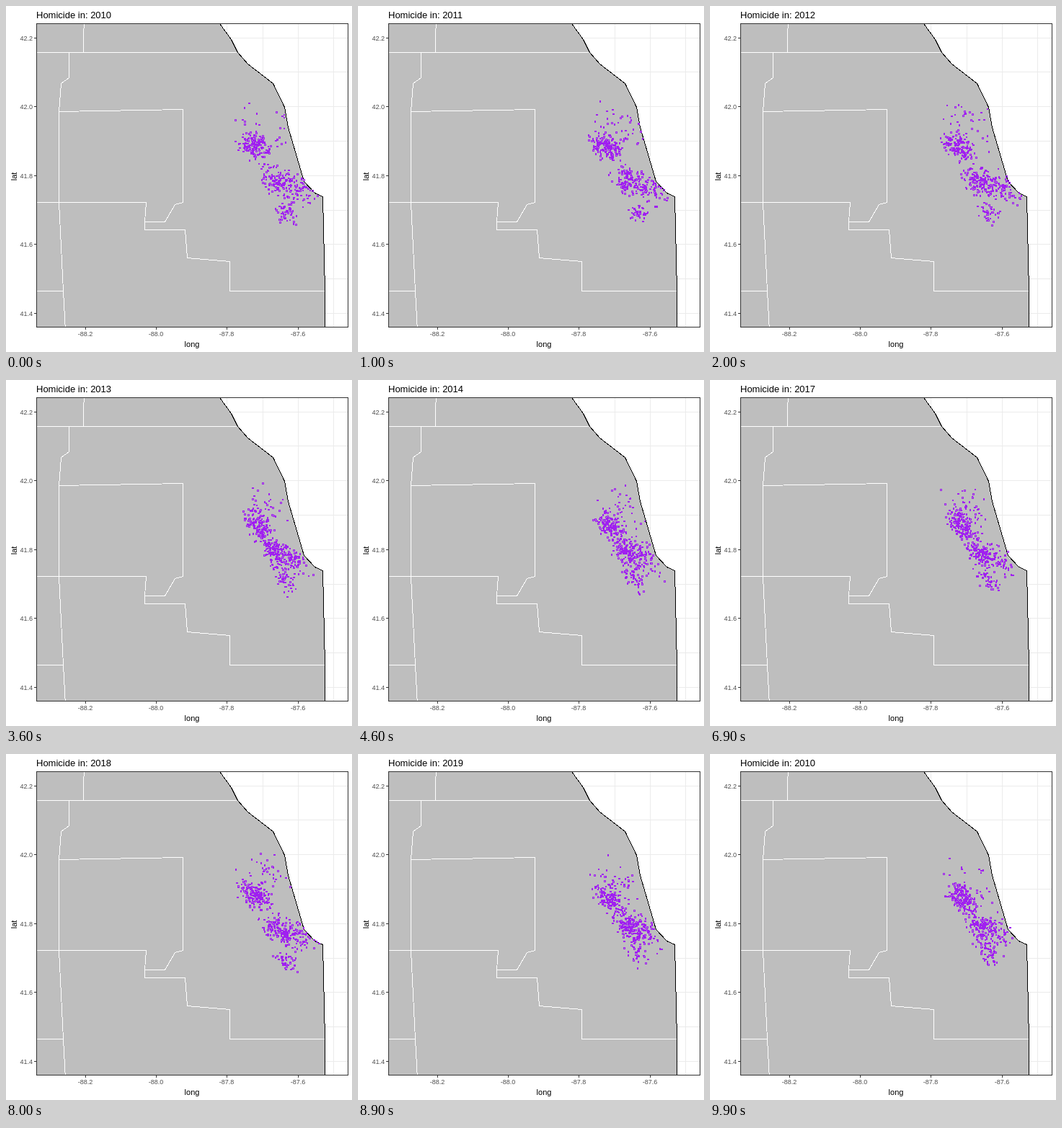
Write an HTML page that moves like this. It is 480x480 px and loops after 10000 ms.

```html
<!DOCTYPE html>
<html lang="en">
<head>
<meta charset="utf-8">
<title>Yearly map</title>
<style>
  html, body { margin: 0; width: 100%; height: 100%; overflow: hidden; background: #fff; }
  svg { display: block; width: 480px; height: 480px; font-family: "Liberation Sans", Arial, sans-serif; }
  path, rect { fill: none; shape-rendering: crispEdges; }
  #labels { font-size: 9px; fill: #4d4d4d; }
</style>
</head>
<body>
<svg viewBox="0 0 480 480">
  <path id="grid" stroke="#ebebeb"/>
  <path id="land" style="fill:#bebebe"/>
  <path stroke="#fff" d="M42 64.5H321M108.1 24L107.6 64.5M87.5 64.5V99.5L76.5 107.5 73.5 146.5V272.5L79.5 395.5 82.2 445
    M73.5 146.5L245.5 143.5V272.5L234.5 275.5 220.5 299.5H192.5V310.5H248.5L251.5 349.5 310.5 354.5V395.5H442
    M42 272.5H194.5L192.5 299.5M42 395.5H79.5"/>
  <path id="coast" stroke="#000"/>
  <path id="dots" stroke="#a020f0"/>
  <rect x="42.5" y="24.5" width="432" height="421" stroke="#333"/>
  <path id="ticks" stroke="#333"/>
  <g id="labels"></g>
  <text id="title" x="42" y="17" font-size="13"></text>
  <text x="258" y="473" font-size="11" text-anchor="middle">long</text>
  <text transform="translate(15 236.5) rotate(-90)" font-size="11" text-anchor="middle">lat</text>
</svg>
<script>
const el = id => document.getElementById(id);
const setPath = (id, d) => el(id).setAttribute('d', d);
const lerp = (a, b, t) => a + (b - a) * t;

// Shoreline from north to south
const shore = [[296, 24], [312, 46], [321, 64], [335, 80], [370, 107], [386, 140],
  [391, 168], [413, 243], [428, 259], [439, 264], [442, 395], [442, 445]];
const shoreLine = 'M' + shore.map(([x, y]) => `${x + .5} ${y + .5}`).join('L');
setPath('coast', shoreLine);
setPath('land', shoreLine + 'H42V24Z');

// Grid, ticks and axis labels
let grid = '', ticks = '', labels = '';
for (let i = 0; i < 9; i++) {
  const y = Math.floor(44 + i * 47.83) + .5;
  const x = Math.floor(110.5 + i * 49.1) + .5;
  grid += `M42 ${y}H474`;
  if (i < 8) grid += `M${x} 24V445`;
  if (i % 2 === 0) {
    ticks += `M39 ${y}H42`;
    labels += `<text x="37" y="${y + 3.5}" text-anchor="end">${(42.2 - i / 10).toFixed(1)}</text>`;
    if (i < 8) {
      ticks += `M${x} 446V449`;
      labels += `<text x="${x - .5}" y="458" text-anchor="middle">${(-88.2 + i / 10).toFixed(1)}</text>`;
    }
  }
}
setPath('grid', grid);
setPath('ticks', ticks);
el('labels').innerHTML = labels;

let seed = 2010;
function random() {
  seed = (seed + 0x6d2b79f5) | 0;
  let t = Math.imul(seed ^ seed >>> 15, 1 | seed);
  t = t + Math.imul(t ^ t >>> 7, 61 | t) ^ t;
  return ((t ^ t >>> 14) >>> 0) / 4294967296;
}
const normal = () => Math.sqrt(-2 * Math.log(1 - random())) * Math.cos(2 * Math.PI * random());

function shoreX(y) {
  const i = shore.findIndex(p => p[1] > y);
  const [x0, y0] = shore[i - 1], [x1, y1] = shore[i];
  return lerp(x0, x1, (y - y0) / (y1 - y0));
}

const clusters = [
  { x: 345, y: 195, spread: 11, share: .34 },
  { x: 377, y: 244, spread: 12, share: .33 },
  { x: 409, y: 253, spread: 13, share: .16 },
  { x: 389, y: 288, spread: 8, share: .1 },
  { x: 362, y: 165, spread: 20, share: .07 }
];

// A random spot near a cluster, on land
function place() {
  for (;;) {
    let pick = random();
    const c = clusters.find(c => (pick -= c.share) < 0) || clusters[0];
    const u = normal(), v = normal();
    const x = c.x + u * c.spread;
    const y = c.y + (u * .3 + v * .85) * c.spread;
    if (u * u + v * v < 6 && y > 128 && y < 306 && x < shoreX(y) + 1) return [x, y];
  }
}
const years = Array.from({ length: 10 }, () => Array.from({ length: 430 }, place));

// Each second: hold, then four steps towards the next year
function draw() {
  const time = performance.now() % 10000;
  const year = Math.floor(time / 1000);
  const next = (year + 1) % 10;
  const mix = Math.max(0, Math.floor(time % 1000 / 100) - 5) / 5;
  let d = '';
  years[year].forEach(([x0, y0], i) => {
    const [x1, y1] = years[next][i];
    const x = lerp(x0, x1, mix), y = lerp(y0, y1, mix);
    const left = Math.round(x - 1.3), top = Math.round(y - 1.3);
    const w = Math.round(x + 1.3) - left - 1, h = Math.round(y + 1.3) - top - 1;
    d += `M${left + .5} ${top + .5}h${w}v${h}h${-w}z`;
  });
  setPath('dots', d);
  el('title').textContent = 'Homicide in: ' + (2010 + (mix > .5 ? next : year));
  requestAnimationFrame(draw);
}
draw();
</script>
</body>
</html>
```
